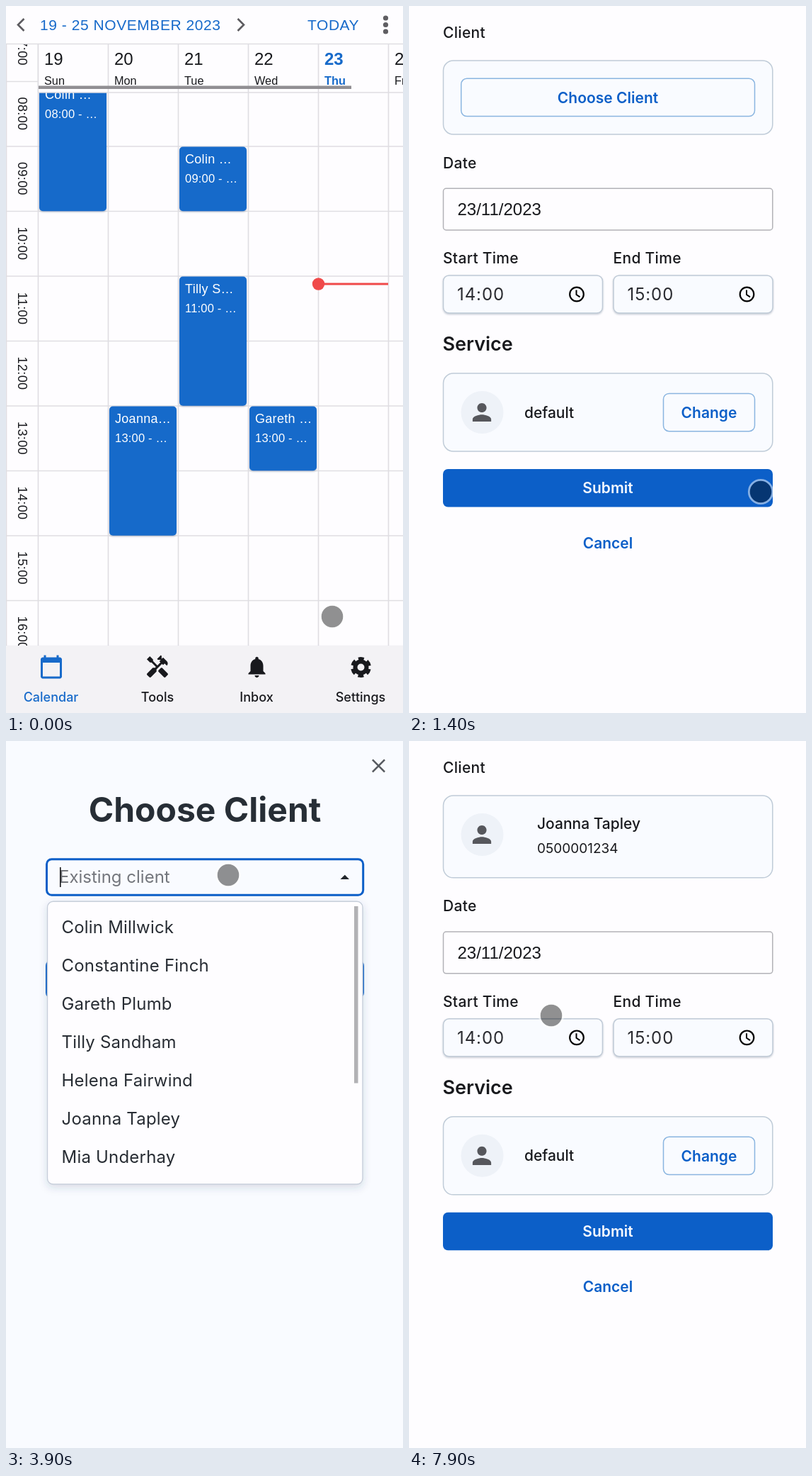
An HTML page for the animation above (8 s loop, 561 px wide and 997 px high).

```html
<!DOCTYPE html>
<html lang="en">
<head>
<meta charset="utf-8">
<title>Booking an appointment</title>
<style>
  html, body { margin: 0; width: 100%; height: 100%; overflow: hidden; background: #fefdff; }
  svg { display: block; width: 100%; height: 100%; }
  text { white-space: pre; }
  .inter { font-family: Inter, sans-serif; }
  .arial { font-family: "Liberation Sans", Arial, sans-serif; }
</style>
</head>
<body>
<svg id="stage" viewBox="0 0 561 997" xmlns="http://www.w3.org/2000/svg"></svg>
<script>
const BLUE = '#0c5fc8', CAL_BLUE = '#176aca', INK = '#18191d', PAPER = '#fefdff', PANEL = '#f9fbff';
const LOOP = 8000, TICK = 100;

const attrs = o => Object.entries(o).map(([k, v]) => `${k}="${v}"`).join(' ');
const rect = (x, y, x2, y2, o = {}) =>
  `<rect x="${x}" y="${y}" width="${x2 - x}" height="${y2 - y}" ${attrs(o)}/>`;
const path = (d, o = {}) => `<path d="${d}" ${attrs(o)}/>`;
const circle = (cx, cy, r, o = {}) => `<circle cx="${cx}" cy="${cy}" r="${r}" ${attrs(o)}/>`;
const group = (body, o = {}) => `<g ${attrs(o)}>${body}</g>`;
const text = (family, s, x, y, size, o = {}) =>
  `<text class="${family}" x="${x}" y="${y}" font-size="${size}" ${attrs({ fill: INK, ...o })}>${s}</text>`;
const inter = (...a) => text('inter', ...a);
const arial = (...a) => text('arial', ...a);
const centered = (s, x, y, fill, size = 21, weight = 600) =>
  inter(s, x, y, size, { fill, 'font-weight': weight, 'text-anchor': 'middle' });
const line = (d, stroke, width) => path(d, { fill: 'none', stroke, 'stroke-width': width });
const cross = (x, y, r, stroke, width) =>
  line(`M${x - r} ${y - r}l${2 * r} ${2 * r}m0 ${-2 * r}l${-2 * r} ${2 * r}`, stroke, width);
const icon = (d, x, y, scale, fill) =>
  path(d, { fill, transform: `translate(${x} ${y}) scale(${scale}) translate(-12 -12)` });

const ICONS = {
  calendar: 'M20 3h-1V1h-2v2H7V1H5v2H4c-1.1 0-2 .9-2 2v16c0 1.1.9 2 2 2h16c1.1 0 2-.9 2-2V5c0-1.1-.9-2-2-2zm0 18H4V8h16v13z',
  tools: 'M21.67 18.17l-5.3-5.3h-.99l-2.54 2.54v.99l5.3 5.3c.39.39 1.02.39 1.41 0l2.12-2.12c.39-.38.39-1.02 0-1.41z' +
    'M17.34 10.19l1.41-1.41 2.12 2.12c1.17-1.17 1.17-3.07 0-4.24l-3.54-3.54-1.41 1.41V1.71L15.22 1l-3.54 3.54.71.71h2.83' +
    'l-1.41 1.41 1.06 1.06-2.89 2.89-4.13-4.13V5.06L4.83 2.04 2 4.87 5.03 7.9h1.41l4.13 4.13-.85.85H7.6l-5.3 5.3' +
    'c-.39.39-.39 1.02 0 1.41l2.12 2.12c.39.39 1.02.39 1.41 0l5.3-5.3v-2.12l5.15-5.15z',
  bell: 'M12 22c1.1 0 2-.9 2-2h-4c0 1.1.89 2 2 2zm6-6v-5c0-3.07-1.64-5.64-4.5-6.32V4c0-.83-.67-1.5-1.5-1.5' +
    's-1.5.67-1.5 1.5v.68C7.63 5.36 6 7.92 6 11v5l-2 2v1h16v-1z',
  person: 'M12 12c2.21 0 4-1.79 4-4s-1.79-4-4-4-4 1.79-4 4 1.79 4 4 4zm0 2c-2.67 0-8 1.34-8 4v2h16v-2c0-2.66-5.33-4-8-4z'
};

// Calendar page
const colX = i => 45.5 + 99 * i;
const hourY = h => 106.5 + 91.5 * (h - 8);
const two = n => String(n).padStart(2, '0');

function booking(day, from, to, name) {
  const x = colX(day) + 1.5, y = hourY(from);
  return rect(x, y + .5, x + 95, hourY(to) - .3, { rx: 5, fill: CAL_BLUE, filter: 'url(#lift)' }) +
    arial(name + '…', x + 8, y + 24, 18, { fill: '#fff', 'letter-spacing': .3 }) +
    arial(two(from) + ':00 - …', x + 8, y + 51, 16.5, { fill: '#fff', 'letter-spacing': .2 });
}

function gear(x, y) {
  const ring = (r, w, extra = {}) => circle(0, 0, r, { fill: 'none', stroke: INK, 'stroke-width': w, ...extra });
  return group(ring(8, 6) + ring(12.4, 4, { 'stroke-dasharray': '7.9 5.085', transform: 'rotate(11.8)' }),
    { transform: `translate(${x} ${y})` });
}

function calendar() {
  let grid = '', hours = '', head = '';
  for (let h = 8; h < 17; h++) grid += `M0 ${hourY(h)}H561`;
  for (let i = 0; i < 6; i++) grid += `M${colX(i)} 54V902`;
  for (let h = 7; h < 17; h++) {
    hours += arial(two(h) + ':00', 0, 0, 18, {
      'text-anchor': 'middle', 'letter-spacing': .4, transform: `translate(17 ${hourY(h) + 45.5}) rotate(90)`
    });
  }
  ['Sun', 'Mon', 'Tue', 'Wed', 'Thu', 'Fri'].forEach((day, i) => {
    const today = i === 4;
    const style = { fill: today ? CAL_BLUE : INK, 'font-weight': today ? 700 : 400 };
    head += arial(19 + i, colX(i) + 8.5, 83, 24, style) + arial(day, colX(i) + 8.5, 111, 16.3, style);
  });
  const gridLines = d => line(d, '#dfdee2', 1.6);
  let headCols = 'M46 122H561';
  for (let i = 0; i < 6; i++) headCols += `M${colX(i)} 54V122`;
  const caps = { fill: CAL_BLUE, 'letter-spacing': .55 };
  const tab = (s, x, fill) => centered(s, x, 981, fill, 18, 500);

  return rect(0, 0, 561, 997, { fill: PAPER }) + gridLines(grid) + hours +
    booking(0, 8, 10, 'Colin ') + booking(2, 9, 10, 'Colin ') + booking(2, 11, 13, 'Tilly S') +
    booking(1, 13, 15, 'Joanna') + booking(3, 13, 14, 'Gareth ') +
    line('M441 392H540', '#f04a4a', 2.8) + circle(441.5, 392, 8.7, { fill: '#f04a4a' }) +
    rect(46, 54, 561, 122, { fill: PAPER }) + gridLines(headCols) + head +
    rect(46, 112.5, 488, 117, { fill: '#918f93' }) +
    rect(0, 0, 561, 53, { fill: PAPER }) + gridLines('M0 53.5H561M.5 54V902') +
    line('M25.5 18l-8.5 8.5 8.5 8.5M327.5 18l8.5 8.5-8.5 8.5', '#5d5c60', 2.6) +
    arial('19 - 25 NOVEMBER 2023', 48, 33.7, 21, caps) + arial('TODAY', 426, 33.7, 21, caps) +
    [17, 26.5, 36].map(y => circle(536.5, y, 3.6, { fill: '#5f5e62' })).join('') +
    rect(0, 902, 561, 1000, { fill: '#f3f2f5', filter: 'url(#lift)' }) +
    icon(ICONS.calendar, 64, 932, 1.5, CAL_BLUE) + icon(ICONS.tools, 214, 932, 1.5, INK) +
    icon(ICONS.bell, 354.5, 932, 1.5, INK) + gear(501.5, 932.5) +
    tab('Calendar', 63.5, CAL_BLUE) + tab('Tools', 214, INK) + tab('Inbox', 354, INK) + tab('Settings', 501, INK);
}

// Appointment form
const label = (s, x, y) => inter(s, x, y, 21, { 'font-weight': 500, 'letter-spacing': .3 });
const card = (y, y2) => rect(48.5, y, 513.8, y2, { rx: 14, fill: PANEL, stroke: '#c0ccd8', 'stroke-width': 1.5 });
const outlined = (x, y, x2, y2) => rect(x, y, x2, y2, { rx: 8, fill: PANEL, stroke: '#8ab5e0', 'stroke-width': 1.5 });
const avatar = y => circle(103.5, y, 30, { fill: '#eef2f8' }) + icon(ICONS.person, 103, y, 1.64, '#56575c');

function timeField(s, x) {
  return rect(x, 380, x + 225, 433, { rx: 8, fill: PANEL, stroke: '#bfcad6', 'stroke-width': 1.5, filter: 'url(#lift)' }) +
    inter(s, x + 19.5, 415, 24, { 'letter-spacing': .9, fill: '#2a2b30' }) +
    circle(x + 188.5, 406.5, 9.8, { fill: 'none', stroke: '#000', 'stroke-width': 2.2 }) +
    line(`M${x + 188} 400.5v6.5l5 3.4`, '#000', 2);
}

function form() {
  const pick = card(77, 181) + outlined(73.7, 102.3, 488.5, 155.5) + centered('Choose Client', 281, 136.5, BLUE);
  const chosen = card(77, 192.8) + avatar(132) +
    inter('Joanna Tapley', 181, 124, 21, { 'font-weight': 500 }) + inter('0500001234', 181, 158, 19);
  const details = label('Date', 48, 228.5) +
    rect(48.5, 257.3, 513.8, 316, { rx: 4, fill: PAPER, stroke: '#b2b2b7', 'stroke-width': 1.5 }) +
    arial('23/11/2023', 68.5, 294.8, 24) +
    label('Start Time', 48, 363) + label('End Time', 288.5, 363) +
    timeField('14:00', 48.5) + timeField('15:00', 289) +
    inter('Service', 47.5, 485.8, 27, { 'font-weight': 600 }) +
    card(518, 628) + avatar(573) + inter('default', 163, 580.5, 21, { 'font-weight': 500 }) +
    outlined(359.5, 546.5, 488.5, 599.7) + centered('Change', 424, 581, BLUE) +
    rect(48, 653, 514, 706.5, { rx: 7, fill: BLUE }) + centered('Submit', 281, 687.3, '#f6f9ff') +
    centered('Cancel', 281, 765, BLUE);
  return rect(0, 0, 561, 997, { fill: PAPER }) + label('Client', 48, 45) +
    group(pick, { id: 'pick' }) + group(chosen, { id: 'chosen' }) + group(details, { id: 'details' });
}

// Client chooser
const CLIENTS = ['Colin Millwick', 'Constantine Finch', 'Gareth Plumb', 'Tilly Sandham',
  'Helena Fairwind', 'Joanna Tapley', 'Mia Underhay'];

function chooser() {
  const dark = { fill: '#272c33' };
  const arrowDown = path('M472.5 189h12.5l-6.2 6.3z', { fill: '#5b5e63' });
  const hint = inter('Existing client', 75, 200, 24, { fill: '#73767c' });
  const list = rect(58.5, 226.3, 504, 625, { rx: 8, fill: PAPER, stroke: '#c6ceda', 'stroke-width': 1.4, filter: 'url(#float)' }) +
    CLIENTS.map((name, i) => inter(name, 78.5, 271.3 + 54 * i, 24, { ...dark, 'letter-spacing': .2 })).join('') +
    rect(492, 233, 497.5, 482.5, { fill: '#b2b2b5' });
  const box = (stroke, width) =>
    rect(57.5, 166.7, 504.7, 217.3, { rx: 7, fill: PANEL, stroke, 'stroke-width': width });

  return rect(0, 0, 561, 997, { fill: PANEL }) + cross(526.5, 35, 8.6, '#55595f', 2.5) +
    centered('Choose Client', 281, 114.3, '#272e36', 48, 700) +
    rect(56, 309, 506, 363, { rx: 8, fill: BLUE }) + centered('Ok', 281, 343.5, '#f6f9ff') +
    line('M180 429.6H382', '#d8dbe1', 1.6) + centered('Or', 281, 481, '#6c727d', 24) +
    centered('Add new Client', 281, 549.2, BLUE) +
    group(box('#c0ccd8', 1.5) + hint + arrowDown, { id: 'idle' }) +
    group(box(BLUE, 3) + hint + path('M472.5 195h12.5l-6.2-6.3z', { fill: '#22262b' }) +
      group(rect(76, 178, 77.6, 206, { fill: INK }), { id: 'caret' }) + list, { id: 'open' }) +
    group(box(BLUE, 3) + inter('Joanna Tapley', 75.5, 200, 24, dark) +
      cross(434.5, 192, 6.6, '#5b5e63', 2) + arrowDown, { id: 'picked' });
}

const stage = document.getElementById('stage');
const shadow = (id, dy, blur, alpha) =>
  `<filter id="${id}" x="-10%" y="-20%" width="120%" height="140%">` +
  `<feDropShadow dx="0" dy="${dy}" stdDeviation="${blur}" flood-color="#304060" flood-opacity="${alpha}"/></filter>`;
stage.innerHTML = `<defs>${shadow('lift', 1.2, 1.2, .3)}${shadow('float', 4, 6, .16)}</defs>` +
  calendar() + rect(0, 0, 561, 997, { id: 'shade' }) +
  group(form(), { id: 'form' }) + group(chooser(), { id: 'chooser' }) +
  group(circle(0, 0, 15.4, { 'fill-opacity': .43 }) +
    circle(0, 0, 16.7, { fill: 'none', stroke: '#fff', 'stroke-opacity': .5, 'stroke-width': 2.8 }), { id: 'pointer' });

// Pointer stops: time, x, y
const STOPS = [
  [100, 461, 861], [900, 497, 685], [1500, 497, 685], [2400, 305, 131], [2900, 305, 131],
  [3700, 314, 189], [4200, 314, 189], [5400, 153, 531], [6100, 153, 531], [6800, 266.5, 339],
  [7300, 266.5, 339], [7900, 201, 387]
];
const CUES = { form: 1130, chooser: 2700, open: 3900, picked: 5800, done: 7100 };

const $ = id => document.getElementById(id);
const show = (id, on) => $(id).setAttribute('display', on ? 'inline' : 'none');
const ease = u => { u = Math.min(1, Math.max(0, u)); return u * u * (3 - 2 * u); };

function pointerAt(t) {
  const i = STOPS.findIndex(s => s[0] > t);
  if (i === 0) return STOPS[0].slice(1);
  if (i < 0) return STOPS[STOPS.length - 1].slice(1);
  const [t0, x0, y0] = STOPS[i - 1], [t1, x1, y1] = STOPS[i];
  const k = ease((t - t0) / (t1 - t0));
  return [x0 + (x1 - x0) * k, y0 + (y1 - y0) * k];
}

function draw(t) {
  const fade = ease((t - CUES.form) / 220), done = t >= CUES.done;
  $('form').setAttribute('opacity', fade);
  $('shade').setAttribute('opacity', fade * .6);
  show('pick', !done);
  show('chosen', done);
  $('details').setAttribute('transform', `translate(0 ${done ? 11.8 : 0})`);
  show('chooser', t >= CUES.chooser && !done);
  show('idle', t < CUES.open);
  show('open', t >= CUES.open && t < CUES.picked);
  show('picked', t >= CUES.picked);
  show('caret', Math.floor((t - 3750) / 530) % 2 === 0);
  $('pointer').setAttribute('transform', `translate(${pointerAt(t)})`);
}

function loop() {
  const t = performance.now() % LOOP;
  draw(t < 2 * TICK ? 0 : Math.floor(t / TICK) * TICK);
  requestAnimationFrame(loop);
}
loop();
</script>
</body>
</html>
```
